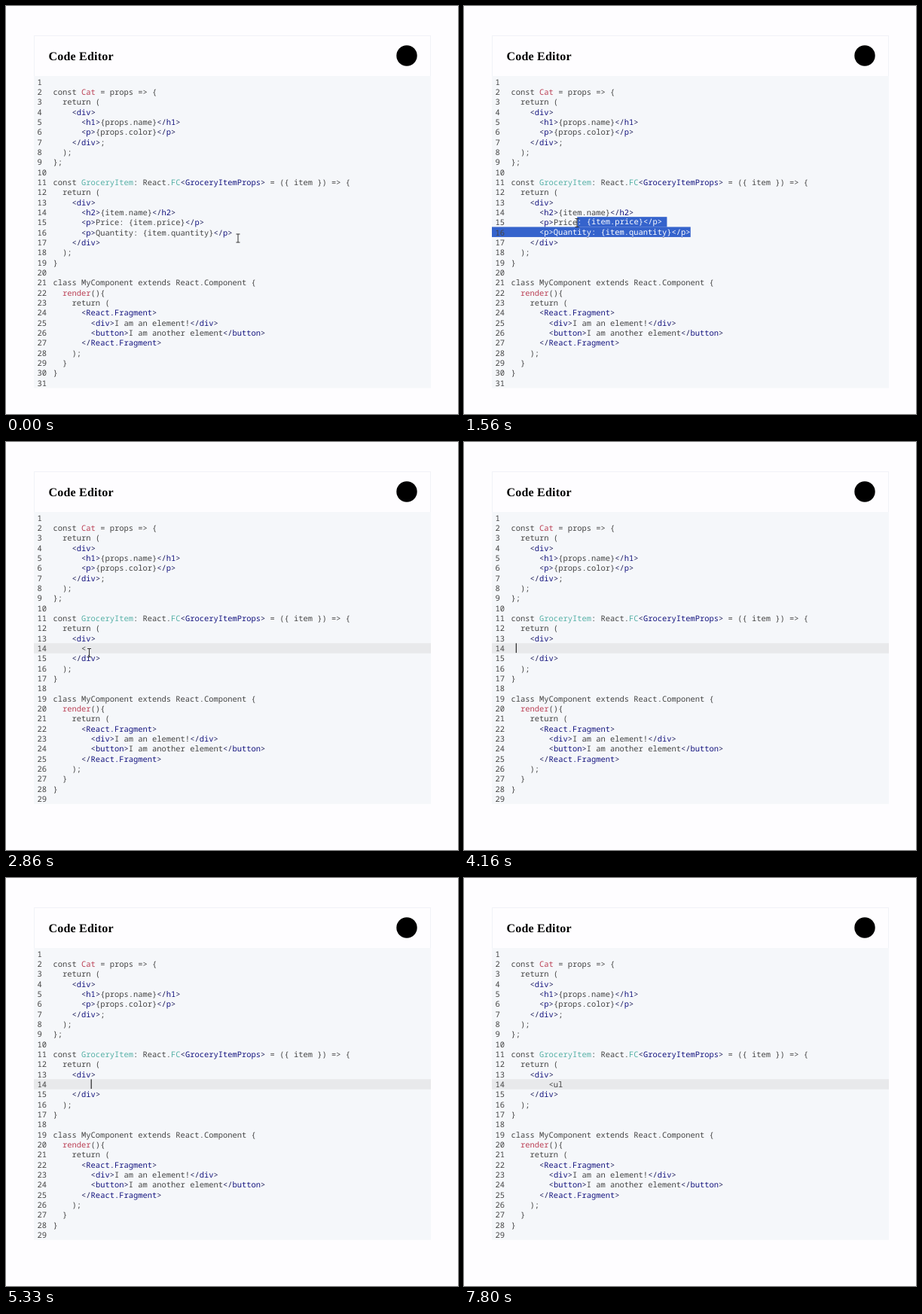
Write an HTML page that moves like this. It is 600 px wide and 542 px high and loops after 8000 ms.

```html
<!DOCTYPE html>
<html lang="en">
<head>
<meta charset="utf-8">
<title>Code Editor</title>
<style>
  html, body { margin: 0; width: 100%; height: 100%; overflow: hidden; background: #fefdff; }
  svg { display: block; }
  text { white-space: pre; text-rendering: geometricPrecision; }
  #view text { font: 10.45px "Noto Sans Mono", "DejaVu Sans Mono", monospace; fill: #444; }
  #title { font: bold 16px "Liberation Serif", "Times New Roman", serif; letter-spacing: .2px; }
  .tag { fill: #22225c; }
  .name { fill: #14147f; }
  .type { fill: #55b0a6; }
  .func { fill: #bb4055; }
  #view .picked { fill: #fff; }
</style>
</head>
<body>
<svg width="600" height="542" viewBox="0 0 600 542">
  <rect x="37.5" y="39.5" width="526" height="54" fill="#fefdff" stroke="#f1f2f7"/>
  <text id="title" x="56.5" y="72">Code Editor</text>
  <circle cx="532" cy="66" r="13.7"/>
  <g id="view"></g>
</svg>
<script>
const LOOP = 8000, LEFT = 37, RIGHT = 564, TOP = 94.2;
const ROW = 40 / 3, COL = 6.27, CODE_X = 62.5, NUM_X = 41.4;

const code = `
const Cat = props => {
  return (
    <div>
      <h1>{props.name}</h1>
      <p>{props.color}</p>
    </div>;
  );
};

const GroceryItem: React.FC<GroceryItemProps> = ({ item }) => {
  return (
    <div>
      <h2>{item.name}</h2>
      <p>Price: {item.price}</p>
      <p>Quantity: {item.quantity}</p>
    </div>
  );
}

class MyComponent extends React.Component {
  render(){
    return (
      <React.Fragment>
        <div>I am an element!</div>
        <button>I am another element</button>
      </React.Fragment>
    );
  }
}
`.split("\n");
const head = code.slice(0, 13), tail = code.slice(16);

// time, lines between head and tail, active row, caret column
const tab = " ".repeat(8);
const edits = [
  [0, code.slice(13, 16)],
  [1950, code.slice(13, 16), 14],
  [2860, ["      <"], 14],
  [3120, ["      <"], 14, 7],
  [3900, ["  "], 14, 2],
  [4160, [" "], 14, 1],
  [4290, [" "], 14],
  [4550, [], 13, 9],
  [4810, [], 13],
  [5200, [""], 14, 0],
  [5330, [tab], 14, 8],
  [5850, [tab], 14],
  [6110, [tab + "<"], 14, 9],
  [7280, [tab + "<u"], 14],
  [7800, [tab + "<ul"], 14]
];

// time, x, y of the mouse
const moves = [
  [0, 308, 308.5], [130, 306, 306], [260, 304, 304], [390, 302, 302],
  [650, 296, 301], [780, 282, 300], [1040, 250, 300], [1170, 222, 299],
  [1300, 195, 296], [1430, 170, 291], [1560, 150, 288], [1690, 132, 284],
  [1820, 118, 280], [1950, 109, 278.5], [2860, 110.5, 280], [3120]
];

const at = (list, t) => list.findLast(step => step[0] <= t);
const rowY = row => TOP + (row - 1) * ROW;
const colX = col => CODE_X + col * COL;
const esc = s => s.replace(/&/g, "&amp;").replace(/</g, "&lt;");
const span = (kind, s) => `<tspan class="${kind}">${esc(s)}</tspan>`;
const rect = (x, y, w, h, fill) =>
  `<rect x="${x}" y="${y}" width="${w}" height="${h}" fill="${fill}"/>`;
const text = (x, row, body, dy = 0, kind = "") =>
  `<text x="${x}" y="${rowY(row) + 10.5 + dy}" class="${kind}">${body}</text>`;

function highlight(line) {
  const parts = line.split(/(<\/?[\w.]+>|GroceryItem(?=:)|\bFC\b|\bCat\b|\brender\b)/);
  return parts.map((s, i) => {
    if (i % 2 == 0) return esc(s);
    const tag = s.match(/^(<\/?)(.+)(>)$/);
    if (tag) return span("tag", tag[1]) + span("name", tag[2]) + span("tag", tag[3]);
    return span(/Cat|render/.test(s) ? "func" : "type", s);
  }).join("");
}

// Selection runs from the mouse to the end of row 16.
function selection(x, y, lines) {
  const first = Math.min(16, Math.floor((y - TOP) / ROW) + 1);
  const start = Math.round((x - CODE_X) / COL);
  let out = "";
  for (let row = first; row <= 16; row++) {
    const line = lines[row - 1], from = row == first ? start : 0;
    const x0 = row == first ? colX(from) : LEFT;
    const x1 = colX(line.length + (row < 16 ? 1 : 0));
    out += rect(x0, rowY(row) - .7, x1 - x0, ROW + .1, "#3563cc")
      + text(colX(from), row, esc(line.slice(from)), -1, "picked");
  }
  return out;
}

function draw(t) {
  const [, middle, active, caret] = at(edits, t);
  const [, mx, my] = at(moves, t);
  const lines = [...head, ...middle, ...tail];
  let out = rect(LEFT, 93, RIGHT - LEFT, rowY(lines.length + 1) - 93, "#f5f7fa");
  if (active) out += rect(LEFT, rowY(active) - .2, RIGHT - LEFT, ROW, "#e8e9eb");
  lines.forEach((line, i) => out += text(CODE_X, i + 1, highlight(line)));
  if (t >= 650 && t < 2860) out += selection(mx, my, lines);
  lines.forEach((_, i) => out += text(NUM_X, i + 1, i + 1));
  if (caret >= 0) out += rect(colX(caret), rowY(active) - .2, 1, ROW - .6, "#000");
  if (mx) out += `<path d="M${mx - 2.5} ${my - 5.5}h5m-2.5 0v11m-2.5 0h5" fill="none" stroke="#333"/>`;
  return out;
}

const view = document.getElementById("view");
let shown = "";
function tick(now) {
  const next = draw(now % LOOP);
  if (next != shown) view.innerHTML = shown = next;
  requestAnimationFrame(tick);
}
tick(performance.now());
</script>
</body>
</html>
```
